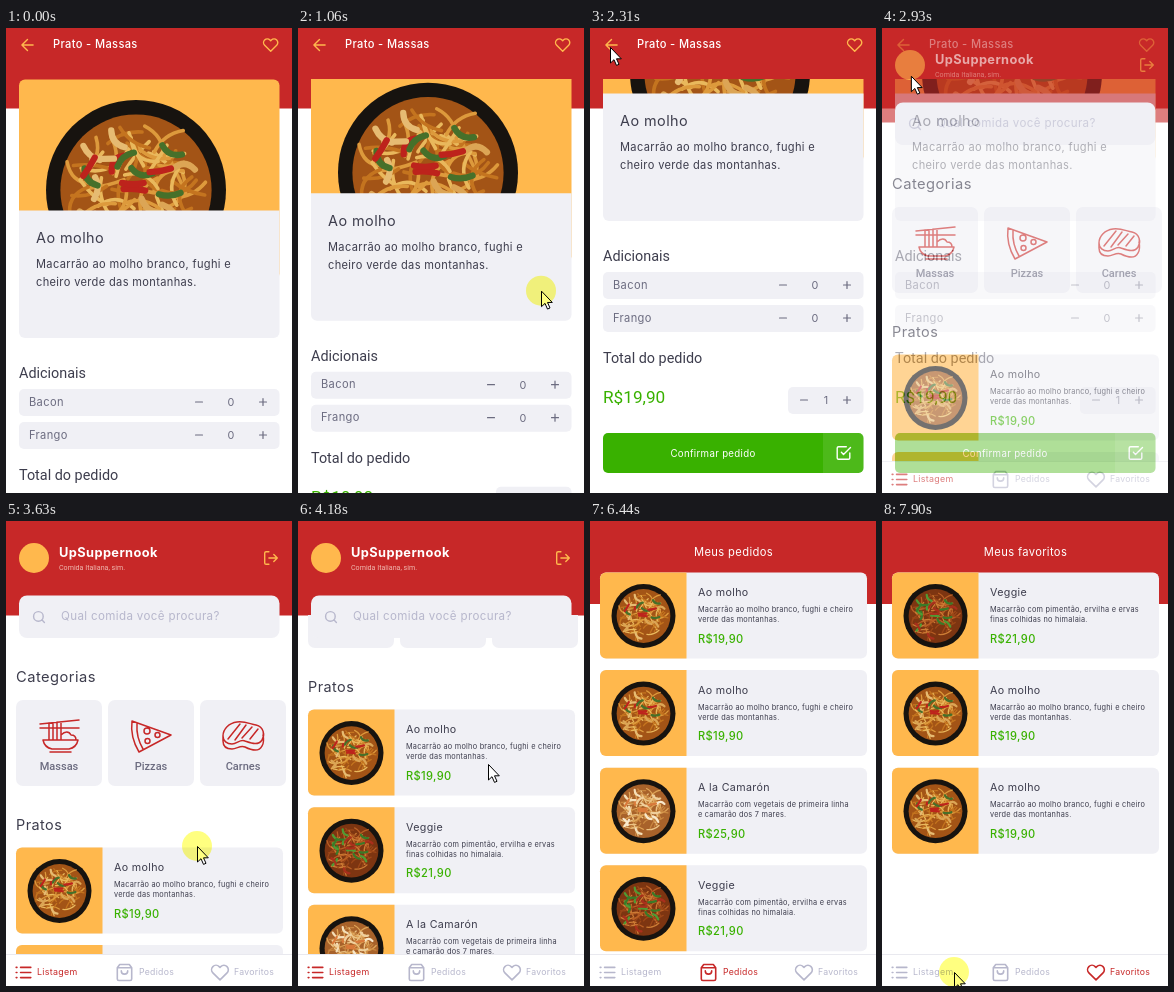
An HTML page that plays this animation: 286x465 px, repeating every 8 s.

```html
<!DOCTYPE html>
<html lang="pt-BR">
<head>
<meta charset="utf-8">
<style>
  html, body { margin: 0; width: 100%; height: 100%; overflow: hidden; background: #fff; }
  svg { display: block; }
  text { font-family: Inter, sans-serif; letter-spacing: .032em; white-space: pre; }
  .rb { font-family: Roboto, sans-serif; letter-spacing: 0; }
  #press { mix-blend-mode: multiply; }
</style>
</head>
<body>
<svg id="stage" width="286" height="465" viewBox="0 0 286 465"></svg>
<script>
const LOOP = 8000;
const RED = '#c72828', GOLD = '#ffb84d', PALE = '#f0f0f5', DARK = '#3d3d4d',
      GREY = '#6c6c80', MUTED = '#b7b7cc', GREEN = '#39b100';

const rect = (x, y, w, h, fill, r = 0) =>
  `<rect x="${x}" y="${y}" width="${w}" height="${h}" rx="${r}" fill="${fill}"/>`;
const text = (x, y, str, size, fill, attrs = '') =>
  `<text x="${x}" y="${y}" font-size="${size}" fill="${fill}" ${attrs}>${str}</text>`;
const line = (d, color, width = 1.2) =>
  `<path d="${d}" fill="none" stroke="${color}" stroke-width="${width}" stroke-linecap="round" stroke-linejoin="round"/>`;
// Icons are drawn on a 24 unit grid around their centre.
const icon = (d, x, y, scale, color, width = 1.4) =>
  `<g transform="translate(${x} ${y}) scale(${scale}) translate(-12 -12)">${line(d, color, width / scale)}</g>`;
const MID = 'text-anchor="middle"', ROBOTO = 'class="rb"', MEDIUM = 'font-weight="500"';

const ICONS = {
  back: 'M20 12H4M12 20L4 12L12 4',
  heart: 'M20.8 4.6a5.5 5.5 0 0 0-7.8 0L12 5.7l-1.1-1.1a5.5 5.5 0 0 0-7.8 7.8L12 21.2l8.8-8.8a5.5 5.5 0 0 0 0-7.8z',
  check: 'M9 11l3 3L22 4M21 12v7a2 2 0 0 1-2 2H5a2 2 0 0 1-2-2V5a2 2 0 0 1 2-2h11',
  search: 'M3 11a8 8 0 1 0 16 0a8 8 0 1 0-16 0M21 21l-4.3-4.3',
  exit: 'M9 21H5a2 2 0 0 1-2-2V5a2 2 0 0 1 2-2h4M16 17l5-5-5-5M21 12H9',
  list: 'M8 5H22M8 12H22M8 19H22M2 5h1M2 12h1M2 19h1',
  bag: 'M6 2L3 6v14a2 2 0 0 0 2 2h14a2 2 0 0 0 2-2V6l-3-4zM3 6H21M16 10a4 4 0 0 1-8 0'
};

const DISHES = {
  sauce: {
    name: 'Ao molho', price: 'R$19,90',
    info: ['Macarrão ao molho branco, fughi e cheiro', 'verde das montanhas.'],
    base: '#a35416', noodles: ['#dd9a3c', '#c4741f', '#e9b85c'],
    bits: ['#e6bb72', '#46702a', '#dca555', '#bd231c']
  },
  veggie: {
    name: 'Veggie', price: 'R$21,90',
    info: ['Macarrão com pimentão, ervilha e ervas', 'finas colhidas no himalaia.'],
    base: '#7d3511', noodles: ['#b95f25', '#9c4718', '#cc7c35'],
    bits: ['#4f9a34', '#3a7a28', '#a92f1c']
  },
  shrimp: {
    name: 'A la Camarón', price: 'R$25,90',
    info: ['Macarrão com vegetais de primeira linha', 'e camarão dos 7 mares.'],
    base: '#a8622a', noodles: ['#dfa558', '#c98740', '#ecc485'],
    bits: ['#f5dfb8', '#efcf9c', '#f8e8cb', '#d9793a']
  }
};

function bowl(x, y, r, dish) {
  let seed = 11;
  const rnd = () => (seed = seed * 16807 % 2147483647) / 2147483647;
  const strand = (color, reach, width) => {
    const a = rnd() * 6.28, d = Math.sqrt(rnd()) * .66, b = rnd() * 6.28, bend = rnd() - .5;
    const dx = Math.cos(b) * reach, dy = Math.sin(b) * reach;
    const cx = Math.cos(a) * d, cy = Math.sin(a) * d;
    const f = n => n.toFixed(3);
    return line(`M${f(cx - dx)} ${f(cy - dy)}q${f(dx - dy * bend * 2)} ${f(dy + dx * bend * 2)} ${f(dx * 2)} ${f(dy * 2)}`, color, width);
  };
  let s = `<circle r="1" fill="#17130f"/><circle r=".84" fill="${dish.base}"/>`;
  for (let i = 0; i < 60; i++) s += strand(dish.noodles[i % 3], .2, .04);
  for (let i = 0; i < 20; i++) s += strand(dish.bits[i % dish.bits.length], .12, .07);
  return `<g transform="translate(${x} ${y}) scale(${r})">${s}</g>`;
}

function card(key, y) {
  const d = DISHES[key];
  return `<g transform="translate(0 ${y})">` + rect(10, 0, 267, 86, PALE, 6) +
    `<path d="M96.5 0V86H16a6 6 0 0 1-6-6V6a6 6 0 0 1 6-6z" fill="${GOLD}"/>` +
    bowl(53.5, 43.5, 32, d) +
    text(108, 23.5, d.name, 10.7, DARK) +
    text(108, 39.5, d.info[0], 7.35, DARK) + text(108, 49.5, d.info[1], 7.35, DARK) +
    text(108, 70, d.price, 11.1, GREEN, MEDIUM) + '</g>';
}
const cards = (keys, top) => keys.map((k, i) => card(k, top + i * 97.6)).join('');

function nav(active) {
  const tint = i => i === active ? RED : MUTED;
  return rect(0, 433, 286, 32, '#fff') + rect(0, 433, 286, 1, '#e9e9ef') +
    icon(ICONS.list, 17.5, 451.5, .73, tint(0), 1.6) + text(31, 454, 'Listagem', 8.9, tint(0)) +
    icon(ICONS.bag, 118.5, 451.5, .8, tint(1), 1.6) + text(133, 454, 'Pedidos', 8.7, tint(1)) +
    icon(ICONS.heart, 214, 451.5, .8, tint(2), 1.6) + text(228, 454, 'Favoritos', 8.7, tint(2));
}

const page = (id, body) => `<g id="${id}">${rect(0, 0, 286, 465, '#fff')}${body}</g>`;

const stepper = (minusX, digitX, y, n) =>
  line(`M${minusX - 3.5} ${y}h7M253.5 ${y}h7M257 ${y - 3.5}v7`, GREY) +
  text(digitX, y + 4, n, 10.8, GREY, MID);
const extra = (y, name) => rect(13, y, 260.5, 27, PALE, 5) +
  text(23, y + 16.5, name, 11.1, GREY) + stepper(193, 225, y + 13, 0);

const detail = page('detail',
  rect(0, 0, 286, 80.5, RED) +
  icon(ICONS.back, 21.5, 17, .7, GOLD) +
  text(47, 20, 'Prato - Massas', 11.1, '#fff', MEDIUM) +
  icon(ICONS.heart, 264.7, 17, .68, GOLD) +
  '<g clip-path="url(#detailClip)"><g id="detailBody">' +
    rect(13, 51.5, 260.5, 200, GOLD, 6) + bowl(130, 162, 90, DISHES.sauce) +
    `<path d="M13 182.5H273.5V304a6 6 0 0 1-6 6H19a6 6 0 0 1-6-6z" fill="${PALE}"/>` +
    text(30, 215, 'Ao molho', 14.4, DARK) +
    text(30, 240, 'Macarrão ao molho branco, fughi e', 11.05, DARK) +
    text(30, 258, 'cheiro verde das montanhas.', 11.05, DARK) +
    text(13, 350, 'Adicionais', 14.4, DARK, ROBOTO) +
    extra(361, 'Bacon') + extra(394, 'Frango') +
    text(13, 452, 'Total do pedido', 14.4, DARK, ROBOTO) +
    text(13, 492, 'R$19,90', 17.2, GREEN, ROBOTO) +
    rect(198, 476, 75.5, 27, PALE, 5) + stepper(214, 236, 489, 1) +
    rect(13, 522, 260.5, 40, GREEN, 5) +
    '<path d="M233 522H268.5a5 5 0 0 1 5 5V557a5 5 0 0 1-5 5H233z" fill="#fff" opacity=".1"/>' +
    text(123, 545.5, 'Confirmar pedido', 9.7, '#fff', MID) +
    icon(ICONS.check, 253.5, 542, .7, '#fff') +
  '</g></g>');

const category = (x, name, art) => rect(x, 179, 86, 86, PALE, 7) + line(art, RED, 1.5) +
  text(x + 43, 249, name, 11, GREY, `${MID} ${ROBOTO} ${MEDIUM}`);

const list = page('list',
  rect(0, 0, 286, 94.5, RED) +
  `<circle cx="28" cy="37" r="15" fill="${GOLD}"/>` +
  text(53, 36, 'UpSuppernook', 12.8, '#fff', 'font-weight="700"') +
  text(53, 49, 'Comida Italiana, sim.', 7.1, '#f0b9b0', ROBOTO) +
  icon(ICONS.exit, 265, 37, .7, GOLD) +
  '<g clip-path="url(#listClip)"><g id="listBody">' +
    text(10, 161, 'Categorias', 14.7, DARK) +
    category(10, 'Massas', 'M34 203L73 199M34 207H73M43 202v17M47 202v17M51 201v18M55 201v18M55 214c4-4 8-4 10 0 4 0 5 2 5 5M37 219H72c-1 5-4 8-9 9H46c-5-1-8-4-9-9zM44 231H65') +
    category(102, 'Pizzas', 'M126 200L165 214L133 231Q124 216 126 200zM131 203Q130 216 137 228M138 210a3 3 0 1 0 6 0a3 3 0 1 0-6 0M149 214a2.5 2.5 0 1 0 5 0a2.5 2.5 0 1 0-5 0M139 220a2.5 2.5 0 1 0 5 0a2.5 2.5 0 1 0-5 0') +
    category(194, 'Carnes', 'M217 215c0-7 6-13 14-14 8-1 13 2 19 3 8 2 9 10 6 15-4 6-11 3-17 1-5-2-8 3-13 3-5 0-9-3-9-8zM217 215v5c0 6 4 8 9 8 5 0 8-4 13-2 6 3 14 5 17-1 2-3 2-6 1-11M222 218L234 203M229 219L240 204M236 217L246 206M244 218L252 208') +
    text(10, 309, 'Pratos', 14.4, DARK) +
    cards(['sauce', 'veggie', 'shrimp'], 326.5) +
  '</g></g>' +
  rect(13, 74.5, 260.5, 42.5, PALE, 8) +
  icon(ICONS.search, 33, 96, .6, MUTED) +
  text(55, 99, 'Qual comida você procura?', 11.55, MUTED) +
  nav(0));

const shelf = (id, title, keys, active) => page(id,
  rect(0, 0, 286, 83, RED) + text(143.5, 35, title, 11.2, '#fff', MID) +
  `<g id="${id}Cards">${cards(keys, 51.5)}</g>` + nav(active));

const $ = id => document.getElementById(id);
$('stage').innerHTML =
  '<clipPath id="detailClip"><rect y="51" width="286" height="414"/></clipPath>' +
  '<clipPath id="listClip"><rect y="94" width="286" height="340"/></clipPath>' +
  detail + list +
  shelf('orders', 'Meus pedidos', ['sauce', 'sauce', 'shrimp', 'veggie'], 1) +
  shelf('favs', 'Meus favoritos', ['veggie', 'sauce', 'sauce'], 2) +
  '<path id="arrow" d="M.5 .5V16L4 12.7L6.5 18.4L9 17.3L6.5 11.8H11.3z" fill="#fff" stroke="#000" stroke-linejoin="round"/>' +
  '<circle id="press" r="15" fill="#ffff80"/>';

// Keys: [time, value, value...], joined by straight lines.
const detailScroll = [[980, 0], [1060, 17], [1140, 44], [1220, 70], [1380, 104], [1540, 117]];
const listScroll = [[3660, 0], [3800, 30], [3950, 82], [4100, 125], [4300, 157], [4480, 166]];
const path = [
  [360, 244, 470], [800, 243, 280], [980, 243, 280], [1060, 243, 263], [1140, 243, 236],
  [1220, 242, 210], [1380, 238, 176], [1520, 225, 166], [1780, 110, 100], [2010, 28, 52],
  [2230, 20, 19], [2560, 20, 19], [2700, 20, 32], [2900, 20, 32], [3250, 120, 210],
  [3550, 191, 325], [3660, 191, 325], [3800, 191, 295], [3950, 190, 243], [4520, 190, 243],
  [4950, 160, 454], [5800, 160, 454], [6360, 225, 460], [6440, 243, 470], [6520, 243, 470],
  [6670, 243, 457], [7300, 243, 457], [7820, 72, 451]
];
const presses = [[820, 1400], [2410, 2470], [3600, 3960], [5190, 5340], [6820, 6900], [7900, LOOP]];

function at(keys, t) {
  const i = keys.findIndex(k => k[0] > t);
  if (i < 0) return keys[keys.length - 1].slice(1);
  if (i === 0) return keys[0].slice(1);
  const a = keys[i - 1], b = keys[i], u = (t - a[0]) / (b[0] - a[0]);
  return a.slice(1).map((v, j) => v + (b[j + 1] - v) * u);
}
const show = (id, on) => $(id).style.display = on ? '' : 'none';
const move = (id, x, y) => $(id).setAttribute('transform', `translate(${x} ${y})`);

function draw(t) {
  show('detail', t < 3050);
  show('list', t >= 2850 && t < 5500);
  $('list').style.opacity = Math.min(1, Math.max(0, (t - 2800) / 220));
  show('orders', t >= 5500 && t < 7060);
  show('ordersCards', t >= 5820);
  show('favs', t >= 7060);
  show('favsCards', t >= 7380);
  move('detailBody', 0, -at(detailScroll, t));
  move('listBody', 0, -at(listScroll, t));
  const [x, y] = at(path, t);
  move('arrow', x, y);
  move('press', x, y);
  show('press', presses.some(([a, b]) => t >= a && t < b));
}

const start = performance.now();
(function tick() {
  draw((performance.now() - start) % LOOP);
  requestAnimationFrame(tick);
})();
</script>
</body>
</html>
```
